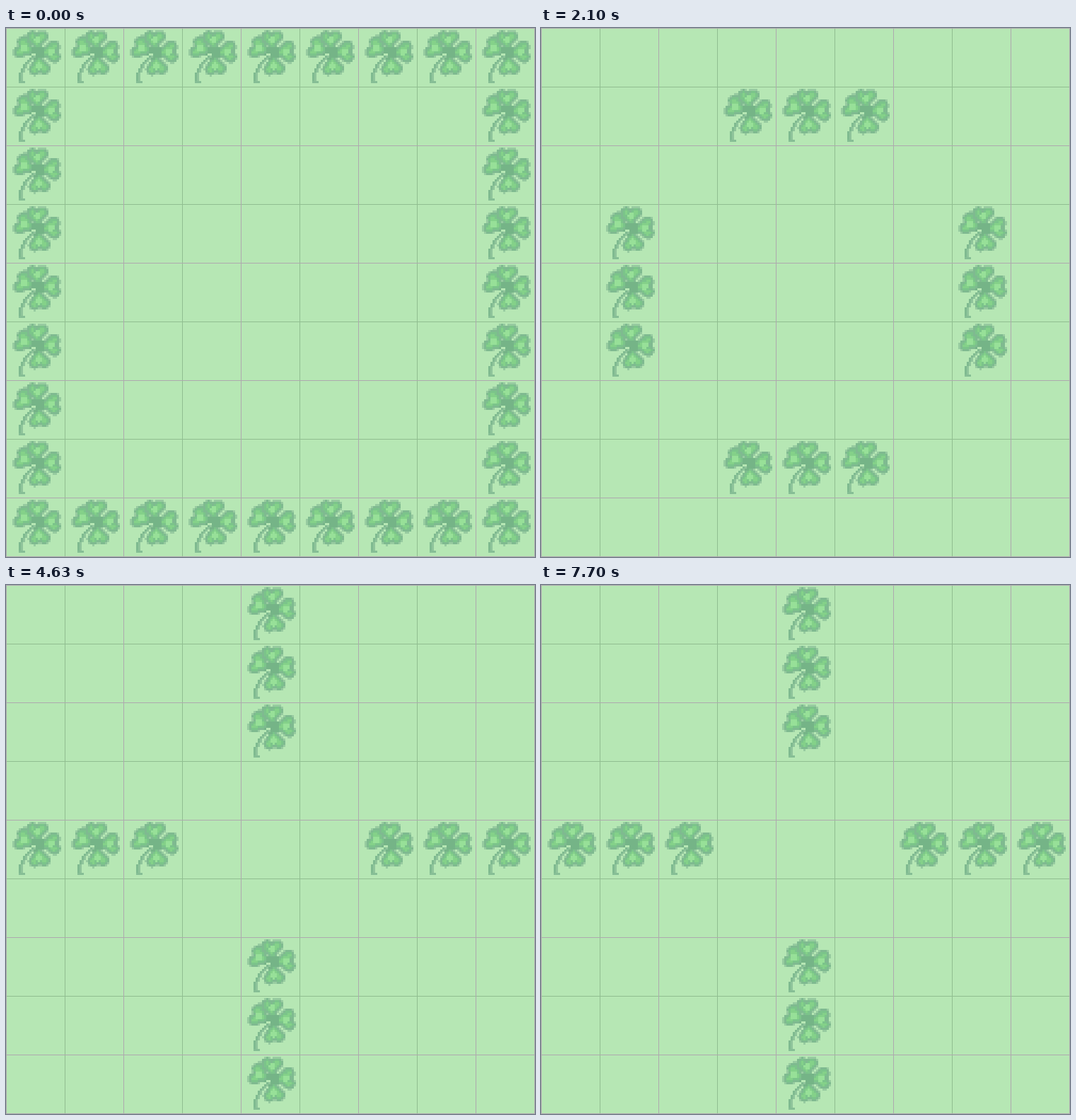
Recreate the animation shown at these times as an HTML page with a canvas. Size 748 by 748 pixels, loop 7830 ms.

```html
<!DOCTYPE html>
<html lang="en">
<head>
<meta charset="utf-8">
<title>Clover life</title>
<style>
  html, body { margin: 0; width: 100%; height: 100%; overflow: hidden; background: #b6e7b4; }
  canvas { display: block; width: 748px; height: 748px; }
</style>
</head>
<body>
<canvas id="stage" width="748" height="748"></canvas>
<script>
const SIZE = 9, CELL = 83, BLOCK = 3, LOOP = 7830;
const STEPS = [500, 1030, 1560, 2100, 2560, 3100, 3630, 4100, 4630, 5160, 5630, 6160, 6700, 7160, 7700];
const ctx = document.getElementById('stage').getContext('2d');

// Clover geometry, in blocks: hub and [angle, scale] of each leaf
const HUB = [14.8, 11.7];
const LEAVES = [[-90, 1], [-160, 1.05], [-4, 1.04], [83, 1]];

function leafColor(x, y) {
  let best = 0, color = null;
  for (const [deg, scale] of LEAVES) {
    const a = deg * Math.PI / 180;
    const dx = (x - HUB[0]) / scale, dy = (y - HUB[1]) / scale;
    const u = dx * Math.cos(a) + dy * Math.sin(a);
    const v = Math.abs(dy * Math.cos(a) - dx * Math.sin(a));
    const lobe = 3.1 - Math.hypot(u - 7.6, v - 2.3);
    const wedge = u < 7 ? (0.78 * u - v) * 0.8 : 0;
    const depth = Math.max(lobe, wedge);
    if (depth <= best) continue;
    best = depth;
    if (u < 2.8) color = '#75b487';
    else if (Math.hypot(u - 6.3, v * 1.2) < 1.7) color = '#97e098';
    else if (depth < 0.5) color = '#97cba0';
    else if (depth < 1.35) color = '#7fba90';
    else if (depth < 2.1) color = '#7bc48a';
    else color = '#84d189';
  }
  return Math.hypot(x - HUB[0], y - HUB[1]) < 1.4 ? '#75b487' : color;
}

function makeClover() {
  const sprite = document.createElement('canvas');
  sprite.width = sprite.height = CELL;
  const g = sprite.getContext('2d');
  const block = (x, y, w, color) => {
    g.fillStyle = color;
    g.fillRect(x * BLOCK, y * BLOCK, w * BLOCK, BLOCK);
  };
  for (let y = 13; y < 26; y++) {
    const t = (y * BLOCK + 1.5 - 40) / 36;
    const x = Math.round((20 + 19 * (1 - t) ** 2) / BLOCK) - 1;
    block(x, y, 2, '#7fba90');
    block(x + 1, y, 1, '#8fc49b');
  }
  block(6, 25, 3, '#86be95');
  for (let y = 1; y < 26; y++)
    for (let x = 3; x < 26; x++) {
      const color = leafColor(x + 0.5, y + 0.5);
      if (color) block(x, y, 1, color);
    }
  return sprite;
}

// Game of Life on a bounded board
function next(board) {
  return board.map((row, y) => row.map((alive, x) => {
    let count = -alive;
    for (let j = y - 1; j <= y + 1; j++)
      for (let i = x - 1; i <= x + 1; i++) count += board[j]?.[i] || 0;
    return +(count === 3 || (alive && count === 2));
  }));
}

const range = [...Array(SIZE).keys()];
const onEdge = n => n === 0 || n === SIZE - 1;
const boards = [range.map(y => range.map(x => +(onEdge(x) || onEdge(y))))];
STEPS.forEach(() => boards.push(next(boards.at(-1))));

const clover = makeClover();

function drawGrid() {
  ctx.fillStyle = '#b6e7b4';
  ctx.fillRect(0, 0, 748, 748);
  const line = n => {
    ctx.fillRect(n * CELL, 0, 1, 748);
    ctx.fillRect(0, n * CELL, 748, 1);
  };
  ctx.fillStyle = '#90be90';
  for (let n = 1; n < SIZE; n += 2) line(n);
  ctx.fillStyle = '#aea9ae';
  for (let n = 0; n < SIZE; n += 2) line(n);
  line(SIZE);
}

let shown = -1;
function draw(now) {
  const time = now % LOOP;
  const generation = STEPS.filter(step => step <= time).length;
  if (generation !== shown) {
    shown = generation;
    drawGrid();
    boards[generation].forEach((row, y) => row.forEach((alive, x) => {
      if (alive) ctx.drawImage(clover, x * CELL, y * CELL);
    }));
  }
}

const start = performance.now();
function tick() {
  draw(performance.now() - start);
  requestAnimationFrame(tick);
}
tick();
</script>
</body>
</html>
```
